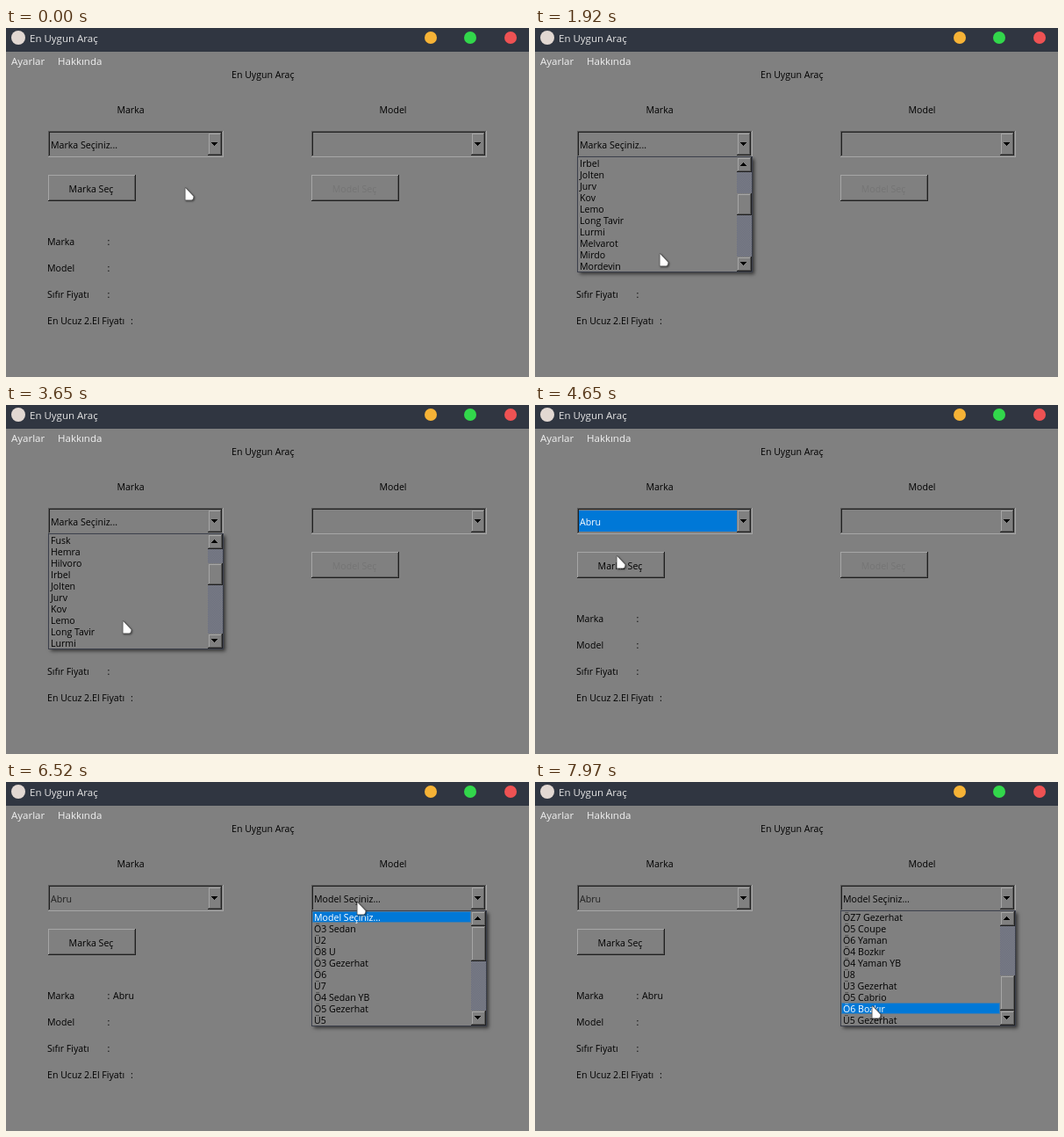
Write an HTML page with a canvas that moves like this. It is 596x397 px and loops after 8000 ms.

```html
<!DOCTYPE html>
<html lang="tr">
<head>
<meta charset="utf-8">
<title>En Uygun Araç</title>
<style>
html, body { margin: 0; width: 100%; height: 100%; overflow: hidden; background: #808080; }
canvas { display: block; width: 596px; height: 397px; }
</style>
</head>
<body>
<canvas id="stage" width="596" height="397"></canvas>
<script>
const ctx = document.getElementById('stage').getContext('2d');
const LOOP = 8000, STEP = 66.45, LAST = 120;
const GREY = '#808080', LIGHT = '#a6a6a6', DARK = '#5a5a5a', BLACK = '#202020', BLUE = '#0078d7';
const FACE = '"Open Sans", "Noto Sans", sans-serif';
const ROW = 13, ROWS = 10, LIST_TOP = 147, BAR = 17;

const brands = ('Marka Seçiniz...|Abru|Bzk|Calveno|Delru|Felo|Fusk|Hemra|Hilvoro|Irbel|Jolten|Jurv|Kov|Lemo|' +
  'Long Tavir|Lurmi|Melvarot|Mirdo|Mordevin|Mulk|Nalvo|Nerdil|Obru|Palvent|Pindero|Prulna|Revko|' +
  'Rolvane|Selk|Sulmo|Snelp|Stravondu|Sorvek|Sivano|Telvar|Vandelroth|Virna').split('|');
const models = ('Model Seçiniz...|Ö3 Sedan|Ü2|Ö8 U|Ö3 Gezerhat|Ö6|Ü7|Ö4 Sedan YB|Ö5 Gezerhat|Ü5|' +
  'Ö1 Gezerhat|Ü3|Ö7 Gezerhat|Ö6 Sedan|ÖZ7 Gezerhat|Ö5 Coupe|Ö6 Yaman|Ö4 Bozkır|Ö4 Yaman YB|Ü8|' +
  'Ü3 Gezerhat|Ö5 Cabrio|Ö6 Bozkır|Ü5 Gezerhat').split('|');

const clamp = (v, lo, hi) => Math.max(lo, Math.min(hi, v));
const smooth = k => k * k * (3 - 2 * k);

// Rows scrolled since a step, three per wheel notch
const wheel = (n, since, rate, max) => clamp(3 * Math.floor((n - since) * rate), 0, max);

const popups = [
  { x: 48, items: brands, from: 10, to: 70, top: n => wheel(n, 23, 0.5, 27) - wheel(n, 51, 1.75, 27) },
  { x: 348, items: models, from: 98, to: LAST + 1, top: n => wheel(n, 102, 0.75, 14) }
];

// Pointer moves: [first step, last step, x, y]
const origin = [204, 182];
const moves = [
  [5, 10, 155, 131], [10, 14, 143, 152], [16, 18, 141, 177], [18, 23, 142, 257], [35, 38, 140, 258],
  [50, 52, 133, 246], [57, 63, 92, 177], [63, 64, 82, 161], [67, 68, 93, 167], [69, 70, 93, 172],
  [84, 98, 400, 137], [98, 102, 393, 188], [110, 120, 384, 255]
];

function pointerAt(n) {
  let [x, y] = origin;
  for (const [a, b, toX, toY] of moves) {
    const k = smooth(clamp((n - a) / (b - a), 0, 1));
    x += (toX - x) * k;
    y += (toY - y) * k;
  }
  return [Math.round(x), Math.round(y)];
}

// The highlight follows pointer movement only, so wheel scrolling carries it along
function highlightAt(popup, n) {
  let sel = 0;
  for (let k = popup.from; k <= n; k++) {
    const [x, y] = pointerAt(k), [px, py] = pointerAt(k - 1);
    if (y >= LIST_TOP && (x !== px || y !== py)) sel = popup.top(k) + Math.floor((y - LIST_TOP) / ROW);
  }
  return sel;
}

function rect(x, y, w, h, color) {
  ctx.fillStyle = color;
  ctx.fillRect(x, y, w, h);
}

function text(str, x, mid, color = '#000', size = 10.6, align = 'left') {
  ctx.font = `${size}px ${FACE}`;
  ctx.textAlign = align;
  ctx.fillStyle = color;
  ctx.fillText(str, x, mid + 4);
}

function disc(x, y, r, color) {
  ctx.fillStyle = color;
  ctx.beginPath();
  ctx.arc(x, y, r, 0, 7);
  ctx.fill();
}

function edges(x, y, w, h, topLeft, bottomRight) {
  rect(x, y, w, 1, topLeft);
  rect(x, y, 1, h, topLeft);
  rect(x, y + h - 1, w, 1, bottomRight);
  rect(x + w - 1, y, 1, h, bottomRight);
}

function panel(x, y, w, h, [outerTL, outerBR, innerTL, innerBR]) {
  rect(x, y, w, h, GREY);
  edges(x + 1, y + 1, w - 2, h - 2, innerTL, innerBR);
  edges(x, y, w, h, outerTL, outerBR);
}

const RAISED = [LIGHT, BLACK, GREY, DARK];
const KNOB = [GREY, BLACK, LIGHT, DARK];
const SUNKEN = [DARK, LIGHT, BLACK, GREY];

// dir: 1 points down, -1 points up
function arrow(cx, cy, dir) {
  const base = dir > 0 ? cy - 2 : cy + 1;
  for (let i = 0; i < 4; i++) rect(cx - 3 + i, base + dir * i, 7 - 2 * i, 1, '#000');
}

function button(x, label, enabled, pressed) {
  const d = pressed ? 1 : 0;
  panel(x, 167, 100, 30, pressed ? SUNKEN : RAISED);
  text(label, x + 49 + d, 183 + d, enabled ? '#000' : '#747474', 10.6, 'center');
}

function combo(x, label, color, focused) {
  panel(x, 117, 200, 30, SUNKEN);
  if (focused) rect(x + 2, 120, 180, 24, BLUE);
  text(label, x + 3, 133, color);
  panel(x + 182, 119, 16, 26, KNOB);
  arrow(x + 189, 132, 1);
}

function checker(a, b) {
  const tile = document.createElement('canvas');
  tile.width = tile.height = 2;
  const c = tile.getContext('2d');
  c.fillStyle = a;
  c.fillRect(0, 0, 2, 2);
  c.fillStyle = b;
  c.fillRect(0, 0, 1, 1);
  c.fillRect(1, 1, 1, 1);
  return ctx.createPattern(tile, 'repeat');
}
const trough = checker(GREY, '#666c84');

function scrollbar(x, top, count) {
  const height = ROW * ROWS, room = height - 2 * BAR, end = LIST_TOP + height - BAR;
  const thumb = Math.floor(room * ROWS / count);
  const offset = Math.round((room - thumb) * top / (count - ROWS));
  rect(x, LIST_TOP, BAR, height, trough);
  panel(x, LIST_TOP, BAR, BAR, KNOB);
  panel(x, end, BAR, BAR, KNOB);
  panel(x, LIST_TOP + BAR + offset, BAR, thumb, KNOB);
  arrow(x + 7, LIST_TOP + 8, -1);
  arrow(x + 7, end + 8, 1);
}

function drawPopup(popup, n) {
  const { x, items } = popup, top = popup.top(n), sel = highlightAt(popup, n);
  ctx.save();
  ctx.shadowColor = 'rgba(0,0,0,.6)';
  ctx.shadowBlur = 4;
  ctx.shadowOffsetX = ctx.shadowOffsetY = 2;
  rect(x + 1, LIST_TOP, 199, 131, GREY);
  ctx.restore();
  edges(x, LIST_TOP - 1, 200, 132, '#3c404c', '#3c404c');

  for (let r = 0; r < ROWS; r++) {
    const i = top + r, y = LIST_TOP + r * ROW;
    if (i === sel) {
      rect(x + 1, y, 181, ROW, BLUE);
      ctx.strokeStyle = 'rgba(255,135,40,.6)';
      ctx.lineWidth = 1;
      ctx.setLineDash([1, 1]);
      ctx.strokeRect(x + 1.5, y + 0.5, 180, ROW - 1);
      ctx.setLineDash([]);
    }
    text(items[i], x + 3, y + 7, i === sel ? '#fff' : '#000');
  }
  scrollbar(x + 182, top, items.length);
}

function drawPointer([x, y]) {
  ctx.save();
  ctx.translate(x, y);
  ctx.beginPath();
  ctx.moveTo(0.5, 0);
  ctx.lineTo(9.5, 9.5);
  ctx.quadraticCurveTo(9.5, 13, 7.5, 13.5);
  ctx.lineTo(0.5, 13.5);
  ctx.closePath();
  ctx.shadowColor = 'rgba(0,0,0,.6)';
  ctx.shadowBlur = 2;
  ctx.shadowOffsetX = ctx.shadowOffsetY = 1;
  ctx.lineJoin = 'round';
  ctx.lineWidth = 1.5;
  ctx.strokeStyle = '#555';
  ctx.stroke();
  ctx.shadowColor = 'transparent';
  ctx.fillStyle = '#fff';
  ctx.fill();
  ctx.restore();
}

function draw(n) {
  const chosen = n >= 70, locked = n >= 76, loaded = n >= 85;

  rect(0, 0, 596, 397, GREY);
  rect(0, 0, 596, 27, '#303641');
  disc(14, 11, 8, '#e2d8d2');
  text('En Uygun Araç', 27, 12, '#e6e6e6', 11.5);
  disc(484, 11, 7, '#f6b336');
  disc(529, 11, 7, '#32d74b');
  disc(575, 11, 7, '#ee5253');
  text('Ayarlar', 6, 38, '#f0f0f0', 11.5);
  text('Hakkında', 59, 38, '#f0f0f0', 11.5);

  text('En Uygun Araç', 257, 53);
  text('Marka', 142, 93, '#000', 10.6, 'center');
  text('Model', 441, 93, '#000', 10.6, 'center');

  combo(48, brands[chosen ? 1 : 0], locked ? '#202020' : chosen ? '#fff' : '#000', chosen && !locked);
  combo(348, loaded ? models[0] : '', '#000', false);
  button(48, 'Marka Seç', true, n === 74 || n === 75);
  button(348, 'Model Seç', loaded, false);

  ['Marka', 'Model', 'Sıfır Fiyatı', 'En Ucuz 2.El Fiyatı'].forEach((label, i) => {
    const y = 243 + i * 30;
    text(label, 47, y);
    text(':', i < 3 ? 115.5 : 142, y);
  });
  if (loaded) text(brands[1], 122, 243);

  popups.filter(p => n >= p.from && n < p.to).forEach(p => drawPopup(p, n));
  drawPointer(pointerAt(n));
}

const start = performance.now();
function tick() {
  const t = (performance.now() - start) % LOOP;
  draw(Math.min(LAST, Math.floor((t + 8) / STEP)));
  requestAnimationFrame(tick);
}
tick();
</script>
</body>
</html>
```
